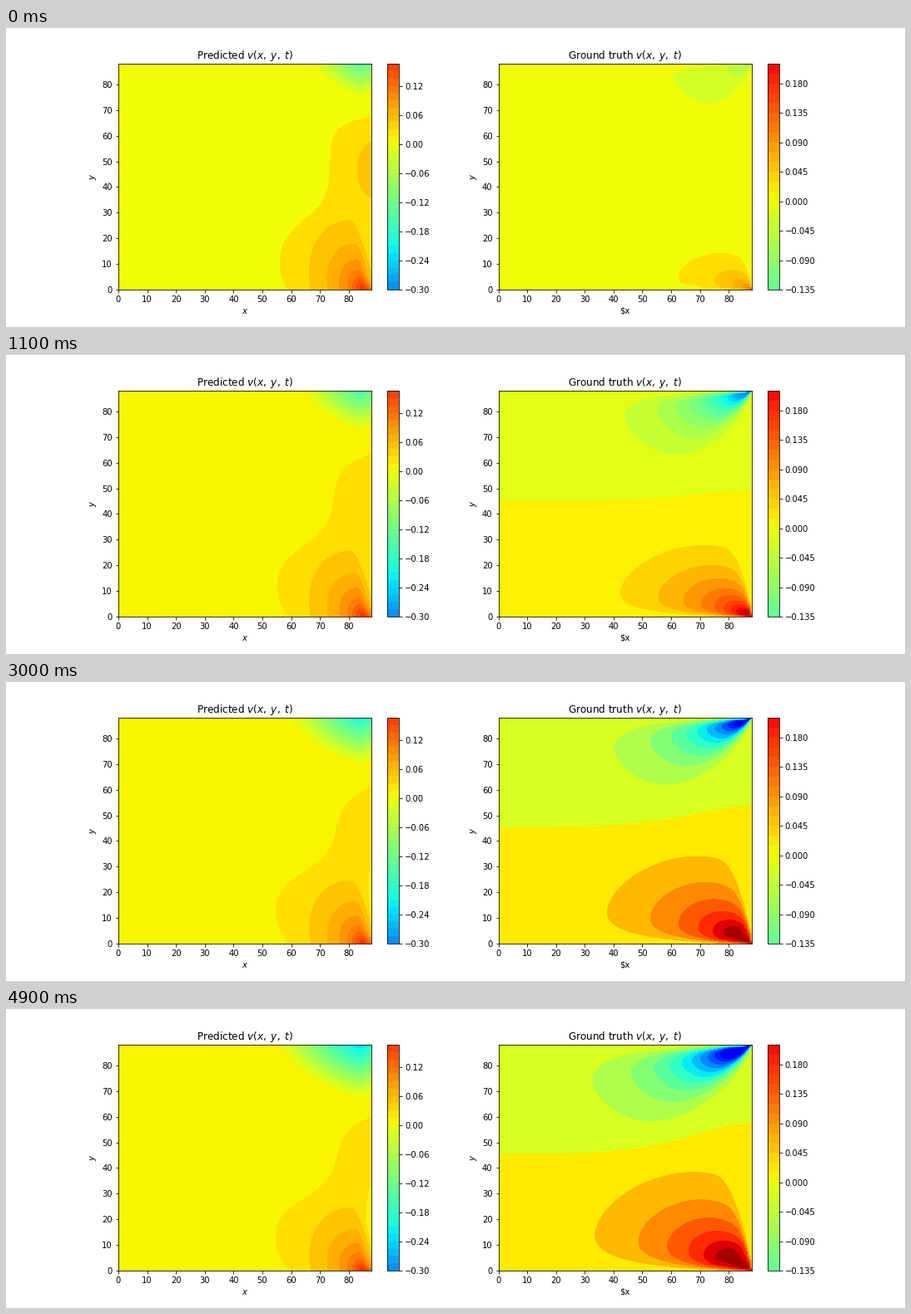
Recreate the animation shown at these times as a matplotlib script. Size 1080 by 360 pixels, loop 5000 ms.

```python
import numpy as np
import matplotlib.pyplot as plt
from matplotlib.animation import FuncAnimation

FRAMES = 50
SIZE = 88
VMIN, VMAX = -0.504, 0.287

X, Y = np.meshgrid(np.arange(SIZE + 1.0), np.arange(SIZE + 1.0))


def mix(a, b, u):
    return a + (b - a) * u


def bump(cx, cy, wx, wy):
    return np.exp(-((X - cx) / wx) ** 2 - ((Y - cy) / wy) ** 2)


def grow(angle, width, power):
    """Rise from 0 at a wall to 1 away from it."""
    return 1 - np.exp(-(angle / width) ** power)


def predicted(n):
    w = n / (FRAMES - 1)
    u = (1 - np.exp(-3.5 * w)) / (1 - np.exp(-3.5))

    # weak plume along the right wall
    foot = mix(4, 6.5, u) * np.exp(-Y / 6)
    shoulder = mix(19, 22, u) / (1 + np.exp((mix(27, 28, u) - Y) / mix(4.5, 4, u)))
    roof = 13 * np.exp(np.minimum((Y - mix(66.8, 60.5, u)) / mix(3, 6, u), 3))
    edge = mix(55, 53.5, u) + foot + shoulder + roof
    v = 0.02 + 0.012 * np.tanh((X - edge) / 15)
    v += max(0.024 - 0.053 * u, 0) * bump(SIZE, 47, 6.5, 12)
    v -= 0.025 * np.clip((u - 0.7) / 0.3, 0, 1) * bump(SIZE, 22, 2.3, 11.5)

    # hot lobe in the lower corner
    dx = X - (85 - 0.17 * Y)
    width = np.where(dx < 0, 18.3, 4 + 10 * np.exp(-Y / 2))
    rho = np.maximum(np.hypot(dx / width, Y / (27 - 2.5 * u)), 0.08)
    hot = 0.04 - np.where(rho > 1, 0.12, 0.048) * np.log(rho)
    v = np.maximum(v, hot)

    # cold lobe at the top
    dx = X - 84
    width = np.where(dx < 0, 16 + 11 * w, 16)
    q = (np.abs(dx / width) ** 1.4
         + ((SIZE - Y) / (13 + 7 * w)) ** 1.4) ** (1 / 1.4)
    cold = mix(0.14, 0.24, w) * np.maximum(1 - q, 0)
    return v * np.clip(2 * (q - 1), 0, 1) - cold


def corner(dy, ax, ay):
    """Angle and stretched distance from a right-hand corner."""
    dx = SIZE - X + 0.2
    dy = dy + 0.2
    return np.degrees(np.arctan2(dy, dx)), np.hypot(ax * dx, ay * dy)


def truth(n):
    e = np.exp(-n / 18)
    s = np.sqrt(n / (FRAMES - 1))
    wall = 6.5 - 3 * e

    a, rho = corner(Y, 0.846, 1.15 + 0.45 * e)
    gain = (0.16 - 0.126 * e) * np.log1p(((66 - 20 * e) / rho) ** 6) / 6
    shape = (grow(a, wall, 1.5) * grow(90 - a, 13, 4)
             * (1 - 0.3 * ((a - 36) / 36) ** 2))
    low = np.minimum(gain, 0.256) * shape

    a, rho = corner(SIZE - Y, 0.9, 1.2)
    gain = mix(0.08, 0.76, s) * np.exp(-rho / mix(12.5, 18.5, s))
    side_edge = 46 + 8 * e + 10 * np.exp(-rho / 18)
    shape = grow(a, wall + 1, 1.5) / (1 + np.exp((a - side_edge) / 7))
    up = np.minimum(gain * shape, 0.43)

    climb = np.sin(np.pi / 2 * (X / SIZE) ** 3.5)
    middle = 44.7 + 0.8 * s + 12 * s ** 1.5 * climb
    sign = np.tanh((middle - Y) / 4)
    return sign * np.maximum(np.where(sign > 0, low, up), 0.003)


def truth_step(n):
    return 0.02 if n < 1 else 0.025 if n < 13 else 0.03 if n < 16 else 0.04


def levels(n, step):
    k = np.arange(-25.0, 16.0)
    if n == 0:  # still fluid: one band around zero
        k = np.sort(np.append(k[(k < -1) | (k > 0)], -0.5))
    return k * step


def fill(ax, v, lev):
    return ax.contourf(X, Y, v, lev, cmap="jet", vmin=VMIN, vmax=VMAX)


def panel(ax, title, xlabel, lo, hi):
    lev = np.arange(lo, hi + 1) * 0.015
    scale = fill(ax, mix(lev[0], lev[-1], X / SIZE), lev)
    fig.colorbar(scale, ax=ax)
    scale.set_visible(False)
    ax.set(title=title, xlabel=xlabel, ylabel="$y$",
           xlim=(0, SIZE), ylim=(0, SIZE),
           xticks=range(0, 90, 10), yticks=range(0, 90, 10))


plt.rcParams.update({"font.family": "DejaVu Sans", "font.size": 10,
                     "text.kerning_factor": 6})
fig, (left, right) = plt.subplots(1, 2, figsize=(15, 5), dpi=72)
fig.subplots_adjust(left=0.125, right=0.9, bottom=0.125, top=0.88, wspace=0.2)
panel(left, r"Predicted $v(x,\;y,\;t)$", "$x$", -20, 11)
panel(right, r"Ground truth $v(x,\;y,\;t)$", "$x", -9, 14)

drawn = []


def update(n):
    while drawn:
        drawn.pop().remove()
    drawn.append(fill(left, predicted(n), levels(n, 0.02)))
    drawn.append(fill(right, truth(n), levels(n, truth_step(n))))
    return drawn


anim = FuncAnimation(fig, update, frames=FRAMES, interval=100,
                     init_func=lambda: update(0), repeat=True)
plt.show()
```
